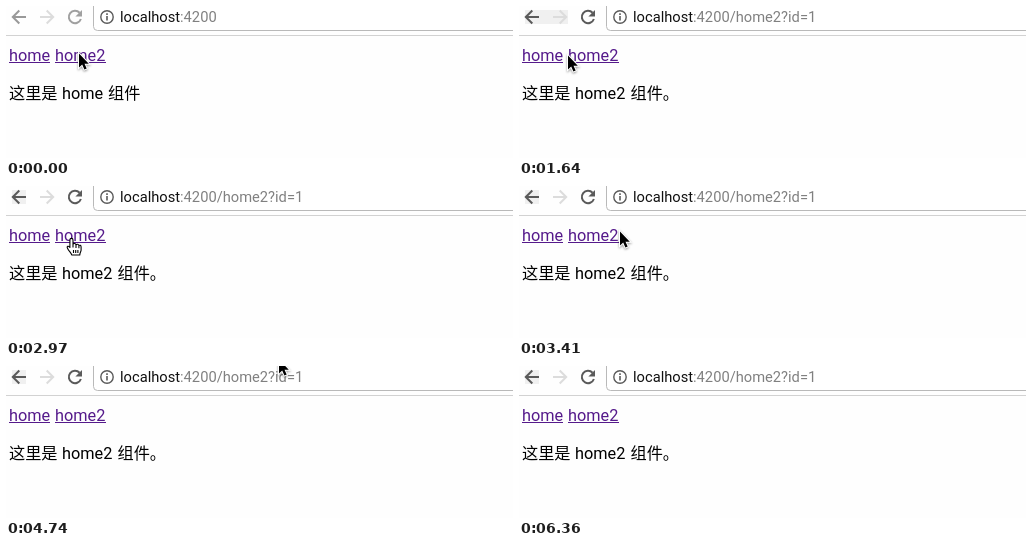
Recreate the animation shown at these times as an HTML page. Size 507 px wide and 152 px high, loop 7710 ms.

```html
<!DOCTYPE html>
<html lang="zh-CN">
<head>
<meta charset="utf-8">
<style>
html, body { margin: 0; width: 100%; height: 100%; overflow: hidden; background: #fefefe; }
svg { display: block; width: 507px; height: 152px; }
text { font-family: Roboto, "Noto Sans CJK SC", "Noto Sans CJK", sans-serif; white-space: pre; }
.url { font-size: 14.7px; }
.page { font-size: 16.3px; }
.cjk { font-family: "Noto Sans CJK SC", "Noto Sans CJK", sans-serif; font-size: 16.2px; }
.link { fill: #551a8b; }
.icon { fill: none; stroke: #5a5a5a; stroke-width: 2; }
#arrow { fill: #000; stroke: #fff; stroke-width: 2; paint-order: stroke; filter: drop-shadow(0 1px 1px #0006); }
#hand { fill: #fff; stroke: #000; stroke-width: 1.1; stroke-linejoin: round; }
</style>
</head>
<body>
<svg viewBox="0 0 507 152">
  <rect id="shade" x="6" y="4" height="14" fill="#f0f0f0"/>
  <rect y="29" width="507" height="1" fill="#d2d2d2"/>
  <rect x="87.5" y="-8" width="440" height="32.5" rx="4" fill="#fff" stroke="#b9b9b9"/>

  <path id="back" class="icon" d="M20 11H7M13.3 4.5 6.8 11l6.5 6.5"/>
  <path class="icon" style="stroke:#dcdcdc" d="M34 11h13M40.7 4.5l6.5 6.5-6.5 6.5"/>
  <g id="reload">
    <path class="icon" style="stroke:inherit" d="M73.6 6.7A6.2 6.2 0 1 0 74.9 13"/>
    <path d="M76 4v6.6h-6.6z" stroke="none"/>
  </g>
  <circle class="icon" style="stroke-width:1.4" cx="101" cy="11" r="6.2"/>
  <path d="M100.2 7.3h1.6v1.6h-1.6zM100.2 10h1.6v4.6h-1.6z" fill="#5a5a5a"/>

  <text class="url" x="114" y="16" fill="#111">localhost<tspan fill="#808080">:4200</tspan><tspan id="path" fill="#808080"></tspan></text>

  <g class="page link">
    <text x="3" y="55">home</text>
    <text x="49" y="55">home2</text>
    <path d="M3 56h41v1H3zM49 56h51v1H49z"/>
  </g>
  <g class="page">
    <text class="cjk" x="3" y="93">这里是</text>
    <text id="name" x="56" y="93"></text>
    <text id="tail" class="cjk" y="93"></text>
  </g>

  <g id="cursor">
    <path id="arrow" d="M1 .5V14.5l3.2-3 2.2 5 2.3-1-2.2-4.7h4.3z"/>
    <path id="hand" transform="translate(.5 1)" d="M-1.6 9.5V2C-1.6-.2 1.5-.2 1.5 2V6.5C1.8 5 4.3 5.2 4.5 7 5 5.7 7.3 6 7.4 7.7 8.2 6.7 9.6 7.3 9.6 9V12C9.6 13.8 8.3 14.5 8.3 17H.2C0 15-2.6 13.4-4 10.2-5 8.4-3.4 7.3-1.6 9.5zM1.5 6.5v3M4.5 7v3M7.4 7.7v2.6M2 12v3M4.2 12v3M6.4 12v3"/>
  </g>
</svg>
<script>
const LOOP = 7710;
const TICK = LOOP / 52; // the screen refreshes 52 times per loop
const $ = id => document.getElementById(id);

const home = { x: 72, y: 47 };
const moves = [
  { from: 6, to: 13, x: 24, y: 51 },    // to the first link
  { from: 14, to: 18, x: 65, y: 51 },   // back to the second link
  { from: 20, to: 27, x: 258, y: 17 },  // up to the address
  { from: 27, to: 32, x: 272, y: -7 },
  { from: 32, to: 35, x: 264, y: 33 },
  { from: 35, to: 37, x: 280, y: 39 },
  { from: 38, to: 43, x: 330, y: -25 }  // off the stage
];

const between = (n, from, to) => n >= from && n < to;

function pointerAt(tick) {
  let { x, y } = home;
  for (const move of moves) {
    const p = Math.min(1, Math.max(0, (tick - move.from) / (move.to - move.from)));
    x += (move.x - x) * p * p;
    y += (move.y - y) * p * p;
  }
  return `translate(${Math.round(x)} ${Math.round(y)})`;
}

function draw(tick) {
  const returned = between(tick, 16, 20);
  const second = tick >= 7 && !returned;
  $("path").textContent = second ? "/home2?id=1" : returned ? "/home" : "";
  $("name").textContent = second ? "home2" : "home";
  $("tail").textContent = second ? "组件。" : "组件";
  $("tail").setAttribute("x", second ? 111.5 : 102);

  $("back").style.stroke = tick < 6 ? "#999" : "#5a5a5a";
  $("reload").style.fill = $("reload").style.stroke = tick < 7 ? "#a0a0a0" : "#5a5a5a";
  $("shade").setAttribute("width", tick < 6 ? 0 : tick < 15 ? 43 : 14);

  const hand = between(tick, 15, 21);
  $("cursor").setAttribute("transform", pointerAt(tick));
  $("arrow").style.display = hand ? "none" : "";
  $("hand").style.display = hand ? "" : "none";
}

const start = performance.now();
let drawn;
function frame() {
  const t = (performance.now() - start) % LOOP;
  const tick = Math.floor(t / TICK + 0.12);
  if (tick !== drawn) draw(drawn = tick);
  requestAnimationFrame(frame);
}
frame();
</script>
</body>
</html>
```
